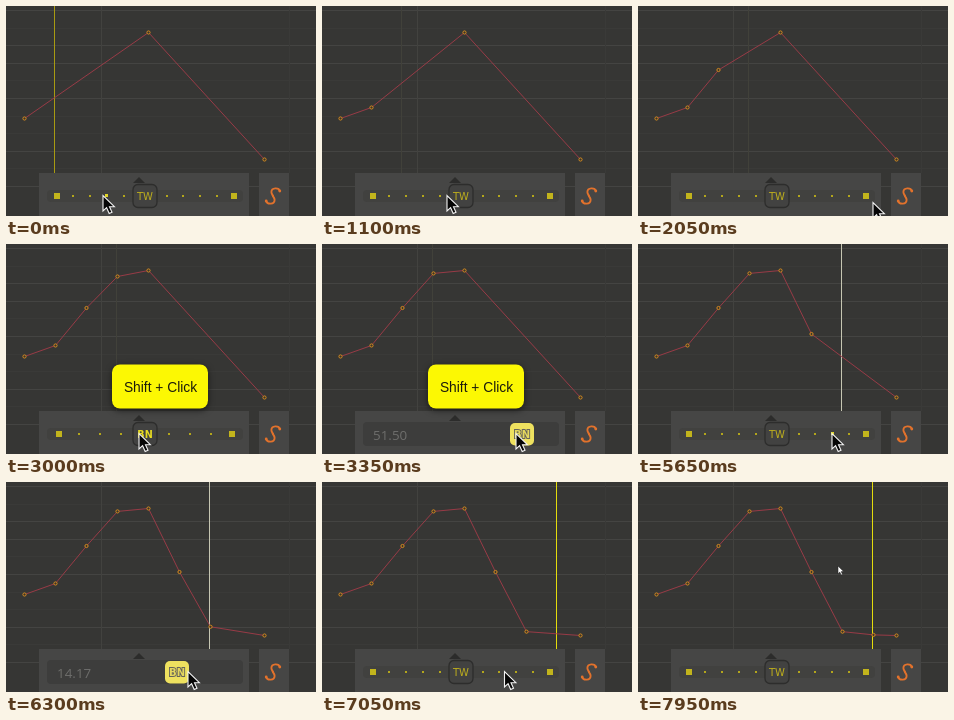
An HTML page with a canvas that plays this animation: 310x210 px, repeating every 8000 ms.

```html
<!DOCTYPE html>
<html lang="en">
<head>
<meta charset="utf-8">
<title>Tween slider</title>
<style>
html, body { margin: 0; width: 100%; height: 100%; overflow: hidden; background: #363634; }
canvas { display: block; width: 310px; height: 210px; }
</style>
</head>
<body>
<canvas id="stage"></canvas>
<script>
const LOOP = 8000, STEP = 50, MID = 139, GAP = 31;
const DRAG_SPEED = 32 / 150;
const canvas = document.getElementById('stage');
const dpr = window.devicePixelRatio || 1;
canvas.width = 310 * dpr;
canvas.height = 210 * dpr;
const ctx = canvas.getContext('2d');
ctx.scale(dpr, dpr);

const first = { slot: 0, y: 112 }, peak = { slot: 4, y: 26 }, last = { slot: 240 / GAP, y: 153 };

// The blend drags pull the knob to the right at a constant speed
const dragA = { show: 2950, press: 3064, release: 3500, reach: 61 };
const dragB = { show: 6100, press: 6150, release: 6500, reach: 67 };
const drags = [dragA, dragB];

// Each new key lies at a share of the way between its neighbours
const rise = [
  { at: 300, share: 0.128 }, { at: 1500, share: 0.5 }, { at: 2400, share: 0.84, drag: dragA }
];
const fall = [
  { at: 4750, share: 0.5 }, { at: 5700, share: 0.84, drag: dragB }, { at: 7500, share: 0.84 }
];

// The playhead advances one slot at each of these times
const jumps = [800, 1800, 3800, 3900, 5350, 6800];
const lineColors = ['#a89a12', '#41413a', '#41413a', '#85851f', '#8c8b1c', '#c6c6b2', '#e4dc0c'];

// Pointer glides: start, end, distance
const glides = [
  [0, 150, -30], [450, 550, 58], [1100, 1400, 13], [2000, 2050, 97], [2050, 2250, -41],
  [2800, 2950, -61], [4150, 4600, -47], [5550, 5650, 47], [5750, 5900, -44],
  [6950, 7150, -69], [7250, 7450, 74]
];

const within = (t, a, b) => t >= a && t < b;
const clamp = v => Math.max(0, Math.min(1, v));
const lerp = (a, b, k) => a + (b - a) * k;
const strength = off => (off / 85) ** 2;
const offset = (d, t) => Math.max(0, Math.min(d.reach, (t - d.press) * DRAG_SPEED));

function pointerAt(t) {
  if (t >= 7900) return { x: lerp(197, 200, clamp((t - 7900) / 50)), y: 84, small: true };
  if (within(t, 5050, 5550) || t >= 7750) return null;
  let x = 97;
  for (const [from, to, distance] of glides) x += distance * clamp((t - from) / (to - from));
  for (const d of drags) x += offset(d, t);
  return { x, y: 189.5 + 0.7 * Math.max(0, x - 225) };
}

function span(start, added, end, t) {
  const keys = [start];
  added.filter(k => t >= k.at).forEach((k, i) => {
    let y = lerp(keys[i].y, end.y, k.share);
    if (k.drag) y = lerp(y, end.y, strength(offset(k.drag, t)));
    keys.push({ slot: start.slot + i + 1, y });
  });
  return keys;
}

function rect(x, y, w, h, color) {
  ctx.fillStyle = color;
  ctx.fillRect(x, y, w, h);
}

function round(x, y, w, h, r, fill, stroke) {
  ctx.beginPath();
  ctx.roundRect(x, y, w, h, r);
  ctx.fillStyle = fill;
  ctx.fill();
  if (stroke) outline(stroke, 1.3);
}

function outline(color, width) {
  ctx.strokeStyle = color;
  ctx.lineWidth = width;
  ctx.stroke();
}

function disc(x, y, r, color) {
  ctx.beginPath();
  ctx.arc(x, y, r, 0, 7);
  ctx.fillStyle = color;
  ctx.fill();
}

function label(text, x, y, font, color, align = 'center') {
  ctx.font = font;
  ctx.fillStyle = color;
  ctx.textAlign = align;
  ctx.fillText(text, x, y);
}

function drawGrid() {
  rect(0, 0, 310, 210, '#363634');
  for (let i = 0; i < 11; i++) {
    const strong = [0, 2, 3, 5, 8, 10].includes(i);
    rect(0, Math.round(4 + i * 17.6), 310, 1, strong ? '#444442' : '#3a3a38');
  }
  rect(95, 0, 1, 167, '#42423f');
  rect(283, 0, 1, 167, '#3a3a38');
}

function drawCurve(t) {
  const keys = [...span(first, rise, peak, t), ...span(peak, fall, last, t), last]
    .map(k => [18.5 + k.slot * GAP, k.y + 0.5]);
  ctx.beginPath();
  keys.forEach(p => ctx.lineTo(...p));
  outline('#a33b49', 0.9);
  for (const [x, y] of keys) {
    disc(x, y, 1.6, '#3a342a');
    outline('#d48b20', 1);
  }
}

function drawIcon() {
  rect(253, 167, 30, 43, '#464645');
  ctx.save();
  ctx.translate(267, 190);
  ctx.lineCap = 'round';
  // One hook, then the same hook turned half a circle
  for (let i = 0; i < 2; i++) {
    ctx.beginPath();
    ctx.moveTo(0, 0);
    ctx.bezierCurveTo(0.4, 1.4, 1.6, 2, 1.6, 4);
    ctx.bezierCurveTo(1.6, 8.6, -6, 8.6, -6.8, 5);
    outline('#e2722c', 1.9);
    disc(-6.8, 5, 1.4, '#e2722c');
    ctx.rotate(Math.PI);
  }
  ctx.restore();
}

function drawField(name, off) {
  round(41, 178, 196, 24, 4, '#3d3d3c');
  label((strength(off) * 100).toFixed(2), 51, 196, '13.4px "Open Sans", sans-serif', '#6e6e6c', 'left');
  round(MID + off - 12, 179, 24, 22.5, 5, '#eee15f');
  ctx.font = 'bold 10px "DejaVu Sans", sans-serif';
  ctx.textAlign = 'center';
  ctx.lineWidth = 1.8;
  ctx.strokeStyle = '#66645a';
  ctx.strokeText(name, MID + off, 194);
  label(name, MID + off, 194, ctx.font, '#e4d75e');
}

function drawSlider(name, pointer) {
  const blending = name === 'BN';
  const edge = blending ? 86.5 : 88.5;
  const [count, start, pitch] = blending ? [3, 24, 21] : [4, 21.5, 16.8];
  round(41, 184, 196, 12, 4, '#41413f');
  for (const side of [-1, 1]) {
    rect(MID + 0.5 + side * edge - 3, 187, 6, 6, '#c2b41c');
    for (let i = 0; i < count; i++) {
      const x = MID + 0.5 + side * (start + i * pitch);
      const hot = pointer && Math.abs(pointer.x + 2 - x) < 5;
      const size = hot ? 3 : 2;
      rect(Math.floor(x - size / 2), 191 - size, size, size, hot ? '#e0d528' : '#b3a61c');
    }
  }
  const hover = pointer && !pointer.small && within(pointer.x, 126, 153);
  round(127, 178.5, 24, 23, 5, '#424241', '#2d2d2c');
  const weight = hover ? 'bold 9.6px' : '10px';
  label(name, MID, 193.5, weight + ' "DejaVu Sans", sans-serif', hover ? '#e6da22' : '#bdae1d');
}

function drawPanel(t, pointer) {
  rect(33, 167, 210, 43, '#464645');
  ctx.beginPath();
  ctx.moveTo(127, 177);
  ctx.lineTo(133, 171);
  ctx.lineTo(139, 177);
  ctx.fillStyle = '#2c2c2b';
  ctx.fill();
  const drag = drags.find(d => within(t, d.show, d.release + STEP));
  const clicked = [...rise, ...fall].some(k => k.share === 0.5 && within(t, k.at, k.at + STEP));
  if (drag && within(t, drag.press, drag.release)) drawField('BN', offset(drag, t));
  else if (clicked) drawField('TW', 0);
  else drawSlider(drag ? 'BN' : 'TW', pointer);
}

function drawHint() {
  ctx.save();
  ctx.shadowColor = 'rgba(0,0,0,.55)';
  ctx.shadowBlur = 6 * dpr;
  ctx.shadowOffsetY = 2 * dpr;
  round(106, 120.5, 96, 44, 8, '#fcf803');
  ctx.restore();
  label('Shift + Click', 154.5, 147.5, '13.8px "Liberation Sans", Arial, sans-serif', '#1c1c0c');
}

function drawPointer({ x, y, small }) {
  const k = small ? 0.5 : 1;
  ctx.save();
  ctx.translate(x, y);
  ctx.scale(k, k);
  ctx.beginPath();
  [[0, 0], [0, 15.5], [3.6, 12.2], [6.2, 18], [9, 16.8], [6.5, 11.2], [11.4, 11.2]]
    .forEach(p => ctx.lineTo(...p));
  ctx.closePath();
  ctx.fillStyle = small ? '#fff' : '#060606';
  ctx.fill();
  outline(small ? '#222' : '#f4f4f4', 1.1);
  ctx.restore();
}

function draw(t) {
  const pointer = pointerAt(t);
  const slot = jumps.filter(at => at <= t).length;
  drawGrid();
  rect(48 + slot * GAP, 0, 1, 167, lineColors[slot]);
  drawCurve(t);
  drawPanel(t, pointer);
  drawIcon();
  if (within(t, 2900, 3550)) drawHint();
  if (pointer) drawPointer(pointer);
}

function tick() {
  const t = performance.now() % LOOP;
  draw(Math.floor(t / STEP) * STEP);
  requestAnimationFrame(tick);
}
tick();
</script>
</body>
</html>
```
